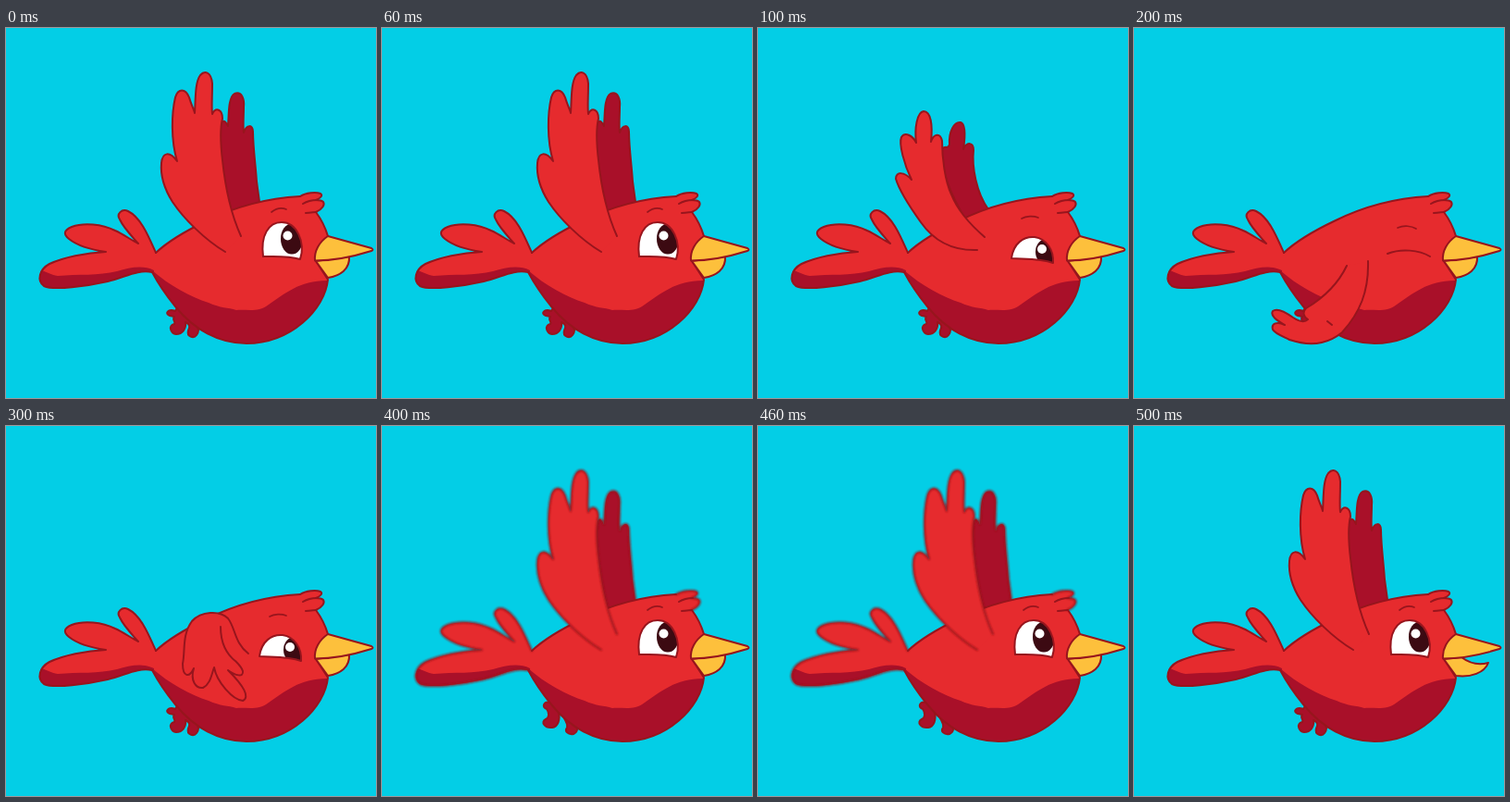
Animation of 400 by 400 pixels, one loop 0.6 s. Source, as an HTML page:

```html
<!DOCTYPE html>
<html lang="en">
<head>
<meta charset="utf-8">
<title>Flapping bird</title>
<style>
  html, body { margin: 0; width: 100%; height: 100%; overflow: hidden; background: #03cee6; }
  svg { display: block; width: 100%; height: 100%; }
  .line { fill: none; stroke: #97151d; stroke-width: 2; stroke-linecap: round; stroke-linejoin: round; }
  .red { fill: #e62b2e; }
  .dark { fill: #a91029; }
  .beak { fill: #fdc03c; }
  .soft .blurs { filter: url(#soft); }
</style>
</head>
<body>
<svg id="bird" viewBox="0 0 400 400">
  <defs>
    <clipPath id="inside"><path id="insidePath"/></clipPath>
    <clipPath id="eyeClip"><path id="eyeHole"/></clipPath>
    <filter id="soft" filterUnits="userSpaceOnUse" x="0" y="0" width="400" height="400">
      <feGaussianBlur stdDeviation="1.2"/>
    </filter>
  </defs>

  <rect width="400" height="400" fill="#03cee6"/>
  <g id="back"><path class="dark"/><path class="line blurs"/></g>
  <g id="feet"><path class="dark"/><path class="line"/></g>
  <path id="bodyFill" class="red"/>
  <g clip-path="url(#inside)" class="dark">
    <path d="M30 264 C38 258 46 267 56 268 C78 266 100 268 120 263 C134 259 148 256 160 262 L160 290 L30 290 Z"/>
    <path d="M158 262 C176 278 200 291 219 297 C232 303 240 302 249 305 C262 304 272 308 284 299
      C302 287 318 272 350 273 L350 350 L190 350 L150 262 Z"/>
  </g>
  <path id="tailLine" class="line blurs"/>
  <path id="bodyLine" class="line"/>
  <path id="tuftLine" class="line blurs"/>
  <path class="line" d="M321 190 C326 187 331 186 336 186 M324 200 C329 200 333 199 335 199"/>

  <path id="brow" class="line" style="stroke-width:1.7"/>
  <g id="eye">
    <path id="white" fill="#fff"/>
    <g clip-path="url(#eyeClip)">
      <ellipse id="pupil" fill="#3c0a12"/>
      <circle id="glint" r="5" fill="#fff"/>
    </g>
  </g>
  <path id="lid" class="line"/>

  <g class="line">
    <path id="lower" class="beak"/>
    <path class="beak" d="M348 225 L395 238 Q398 240 395 241 C376 247 355 251.5 334 251.5 C333 241 339 231 348 225 Z"/>
  </g>
  <g id="front"><path class="red"/><path class="line blurs"/></g>
</svg>

<script>
  const $ = id => document.getElementById(id);
  const STEP = 100;

  // Three connected runs of the outline, each starting where the previous one ends.
  const tail = 'C154 225 146 205 132 198 C125 195 119 201 123 207 C127 216 136 225 143 233 C135 229 127 223 118 219 C104 212 84 210 71 215 C62 219 62 223 68 228 C78 236 94 240 108 242 C86 243 62 248 47 255 C36 261 33 273 41 279 C52 284 88 279 110 274 C130 269 142 261 158 264';
  const body = 'C166 279 174 290 183 301 C203 326 230 341 260 341 C308 341 345 304 348 272 L335 252 L348 225 C345 215 341 207 335 199';
  const tuft = 'C342 196 345 191 343 188 C341 186 338 186 335 186 C340 184 343 181 340 179 C335 177 324 178 318 182';
  const spine = 'C282 184 248 193 217 208.5 C197 218 178 228 162 243';

  const wings = {
    up: {
      back: 'M243 198 C235 172 228 132 232 106 C234 98 237 100 240 106 C241 94 240 75 247 71 C255 68 258 77 257 86 C257 96 256 105 257 113 C260 104 267 104 267 112 C267 128 270 150 271 166 L274 188',
      front: 'M237 242 C215 229 192 206 180 188 C170 172 167 157 168 146 C169 134 177 133 185 144 C178 121 179 92 183 75 C186 65 194 65 198 75 C200 82 203 88 204 92 C205 79 204 59 210 51 C215 45 222 48 223 60 C223 75 222 85 223 93 C227 85 234 88 234 98 C231 110 232 126 234 143 C237 172 244 203 254 225'
    },
    mid: {
      back: 'M225 208 C208 180 197 152 199 131 C202 126 205 132 207 126 C206 112 212 101 219 102 C225 104 224 118 222 131 C226 122 233 124 233 132 C231 150 236 178 249 196',
      front: 'M237 240 C210 241 190 230 176 210 C166 196 153 177 149 163 C149 155 158 155 166 164 C158 148 152 125 155 118 C159 112 167 116 171 124 C169 108 172 91 179 90 C187 90 189 105 187 123 C190 114 197 113 199 122 C199 140 202 165 209 180 C216 198 230 213 245 226'
    },
    down: {
      back: '',
      front: 'M230 257 C221 276 206 291 186 303 C182 307 183 312 188 315 C184 319 178 317 172 313 C165 308 155 302 150 306 C147 311 154 316 163 321 C155 317 148 319 150 326 C152 330 160 333 168 337 C180 341 194 342 203 340 C212 338 219 334 225 329 C244 308 254 285 253 252',
      extra: 'M209 317 L214 321'
    },
    fold: {
      back: '',
      front: 'M262 246 C247 235 248 218 240 208 C231 199 211 200 201 211 C190 226 194 243 191 257 C191 271 198 273 203 262 C199 275 205 284 213 283 C221 279 222 269 225 261 C228 277 245 296 256 297 C264 293 257 281 240 264 C248 270 257 272 256 265 C255 261 252 258 248 254',
      extra: 'M232 217 C232 234 237 246 249 255'
    }
  };

  // Each lid ends at the corner its white closes back from.
  const eyes = {
    wide: {
      lid: 'M318 250 C305 246 292 247 278 247 C275 224 284 210 298 210 C314 210 324 231 318 250',
      brow: 'M287 199 C292 195 298 194 303 196',
      pupil: [309, 228, 12, 16.5], glint: [304.5, 224.5]
    },
    half: {
      lid: 'M319 254 C305 249 290 250 274 249 C276 233 287 225 299 226 C312 228 320 240 319 254',
      brow: 'M285 206 C290 203 298 203 303 205',
      pupil: [312, 242, 12, 14], glint: [307, 239]
    },
    shut: {
      lid: 'M274 244 C289 238 308 240 320 247',
      brow: 'M285 216 C292 213 300 214 305 217'
    }
  };

  const feet = {
    tucked: 'M186 301 L183 306 C175 303 171 309 177 311 L182 312 C179 316 184 317 182 320 C175 322 178 330 184 331 C191 331 195 325 194 318 C199 320 199 323 197 327 C195 334 203 336 206 332 C209 328 208 324 206 321',
    loose: 'M182 299 C175 297 172 304 178 306 C181 310 181 315 177 317 C171 320 176 327 184 326 C190 325 193 318 191 309 M197 316 C199 320 201 322 200 326 C197 330 201 334 207 333 C212 331 212 326 209 322'
  };

  const beaks = {
    closed: 'M335 252 L348 270 C361 268 372 261 371 247 Z',
    open: 'M335 252 L348 270 C364 272 379 267 383 256 C372 259 362 256 354 250 Z'
  };

  const poses = [
    { wing: 'up', eye: 'wide' },
    { wing: 'mid', eye: 'half' },
    { wing: 'down', eye: 'shut' },
    { wing: 'fold', eye: 'half' },
    { wing: 'up', eye: 'wide', feet: 'loose', soft: true },
    { wing: 'up', eye: 'wide', beak: 'open' }
  ];

  function set(id, attrs) {
    for (const key in attrs) $(id).setAttribute(key, attrs[key]);
  }

  function shape(id, fill, line = fill) {
    const [a, b] = $(id).children;
    a.setAttribute('d', fill);
    b.setAttribute('d', line);
  }

  function drawBody() {
    const whole = 'M162 243' + tail + body + tuft + spine + 'Z';
    set('insidePath', { d: whole });
    set('bodyFill', { d: whole });
    set('tailLine', { d: 'M162 243' + tail });
    set('bodyLine', { d: 'M158 264' + body + 'M318 182' + spine });
    set('tuftLine', { d: 'M335 199' + tuft });
  }

  function draw(pose) {
    const wing = wings[pose.wing], eye = eyes[pose.eye];
    shape('back', wing.back);
    shape('front', wing.front, wing.front + (wing.extra || ''));
    shape('feet', feet[pose.feet || 'tucked']);
    set('lower', { d: beaks[pose.beak || 'closed'] });
    set('brow', { d: eye.brow });
    set('lid', { d: eye.lid });
    $('eye').style.display = eye.pupil ? '' : 'none';
    if (eye.pupil) {
      const [cx, cy, rx, ry] = eye.pupil;
      set('white', { d: eye.lid });
      set('eyeHole', { d: eye.lid });
      set('pupil', { cx, cy, rx, ry });
      set('glint', { cx: eye.glint[0], cy: eye.glint[1] });
    }
    $('bird').classList.toggle('soft', !!pose.soft);
  }

  let current = 0;
  function tick(now) {
    const index = Math.floor(now / STEP) % poses.length;
    if (index !== current) draw(poses[current = index]);
    requestAnimationFrame(tick);
  }

  drawBody();
  draw(poses[current]);
  requestAnimationFrame(tick);
</script>
</body>
</html>
```
